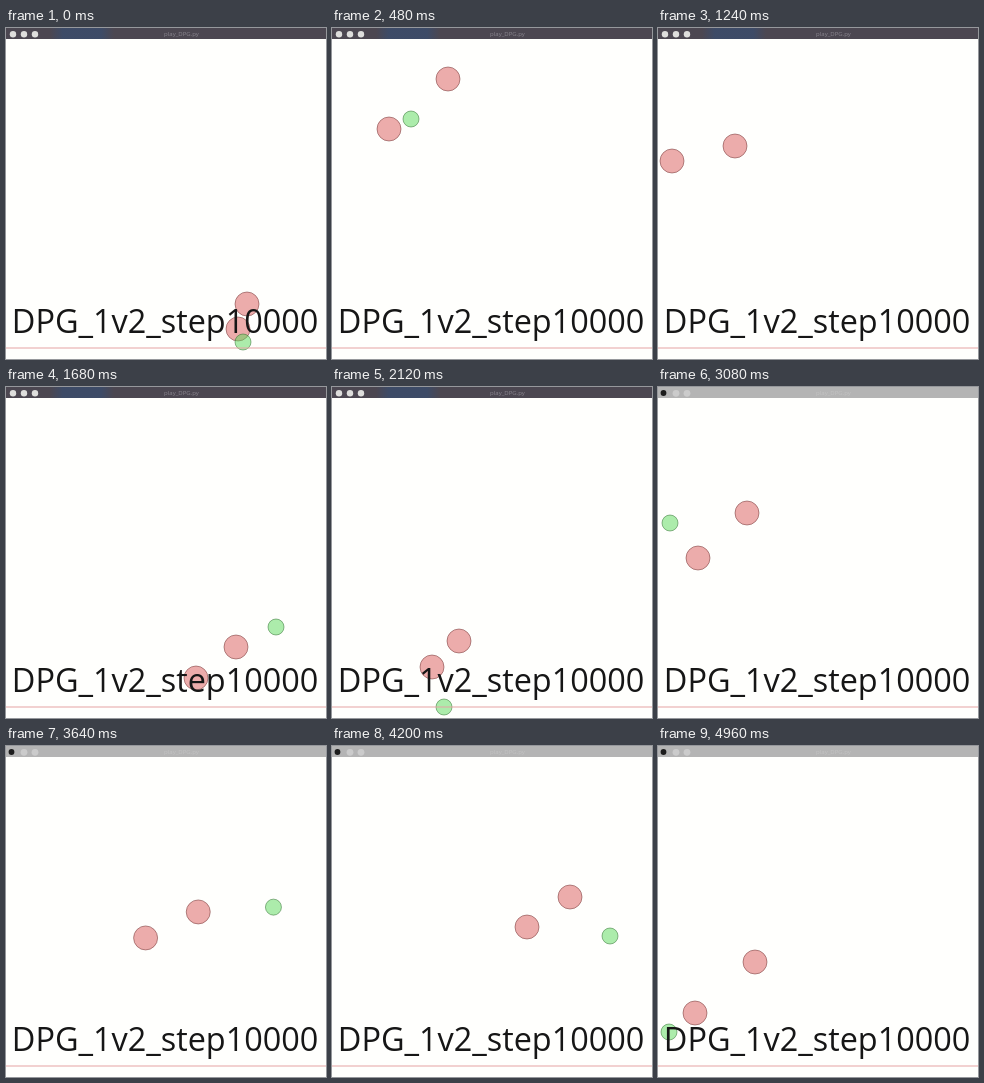
Write an HTML page with a canvas that moves like this. It is 320x331 px and loops after 5 s.

```html
<!DOCTYPE html>
<html lang="en">
<head>
<meta charset="utf-8">
<title>Chase</title>
<style>
  html, body { margin: 0; width: 100%; height: 100%; overflow: hidden; background: #fffffd; }
  canvas { display: block; width: 320px; height: 331px; }
</style>
</head>
<body>
<canvas id="stage"></canvas>
<script>
const W = 320, H = 331, LOOP = 5000, STEP = 40, BAR_SWITCH = 2520;
const canvas = document.getElementById('stage');
const ratio = window.devicePixelRatio || 1;
canvas.width = W * ratio;
canvas.height = H * ratio;
const ctx = canvas.getContext('2d');
ctx.scale(ratio, ratio);

// Waypoints: [time, x, y]
const hunterA = [
  [0, 241, 276], [80, 262, 236], [480, 116, 51], [560, 110, 25], [860, 150, 270],
  [1120, 120, 170], [1240, 77, 118], [1480, 160, 100], [1680, 230, 260], [1800, 285, 200],
  [2120, 127, 254], [2440, 110, 120], [2800, 215, 225], [3080, 89, 126], [3400, 165, 45],
  [3800, 190, 250], [3960, 110, 225], [4200, 238, 151], [4400, 250, 55], [4960, 97, 216]
];
const hunterB = [
  [0, 232, 301], [480, 57, 101], [560, 52, 80], [860, 100, 299], [1240, 14, 133],
  [1680, 190, 291], [1800, 240, 230], [2120, 100, 280], [2240, 52, 250], [2640, 180, 165],
  [2800, 175, 256], [3080, 40, 171], [3400, 110, 80], [3800, 140, 270], [3960, 63, 240],
  [4200, 195, 181], [4400, 215, 90], [4960, 37, 267]
];
const runner = [
  [0, 237, 314], [40, 234, 323], [480, 79, 91], [560, 60, 55], [920, 290, 90],
  [1120, 250, 0], [1240, 200, -20], [1440, 298, 60], [1680, 270, 240], [1840, 250, 300],
  [2120, 112, 320], [2360, 30, 200], [2680, 210, 60], [3080, 12, 136], [3400, 225, 20],
  [3560, 297, 100], [3880, 150, 323], [4200, 278, 190], [4280, 311, 220], [4480, 255, 323],
  [4960, 11, 286]
];

// Cubic through unevenly timed waypoints
function slope(path, i, axis) {
  const a = path[Math.max(i - 1, 0)], b = path[Math.min(i + 1, path.length - 1)];
  return (b[axis] - a[axis]) / (b[0] - a[0]);
}
function along(path, t) {
  let i = 0;
  while (i < path.length - 2 && t >= path[i + 1][0]) i++;
  const a = path[i], b = path[i + 1], span = b[0] - a[0];
  const u = Math.min((t - a[0]) / span, 1), u2 = u * u, u3 = u2 * u;
  return [1, 2].map(k =>
    (2 * u3 - 3 * u2 + 1) * a[k] + (3 * u2 - 2 * u3) * b[k] +
    span * ((u3 - 2 * u2 + u) * slope(path, i, k) + (u3 - u2) * slope(path, i + 1, k)));
}

function disc(x, y, r, fill, stroke) {
  ctx.beginPath();
  ctx.arc(x, y, r, 0, Math.PI * 2);
  ctx.fillStyle = fill;
  ctx.fill();
  if (stroke) {
    ctx.strokeStyle = stroke;
    ctx.lineWidth = 1;
    ctx.stroke();
  }
}
function agent(path, t, r, rgb, edge) {
  const [x, y] = along(path, t);
  disc(x, y, r, `rgba(${rgb},.5)`, `rgba(${edge},.5)`);
}
function label(text, x, y, size, color, align) {
  ctx.font = `${size}px "Open Sans", "Noto Sans", sans-serif`;
  ctx.textAlign = align;
  ctx.fillStyle = color;
  ctx.fillText(text, x, y);
}

function titleBar(light) {
  ctx.fillStyle = light ? '#b4b4b4' : '#4c4751';
  ctx.fillRect(0, 0, W, 11);
  if (!light) {
    const tint = ctx.createLinearGradient(44, 0, 108, 0);
    tint.addColorStop(0, 'rgba(58,76,108,0)');
    tint.addColorStop(.2, 'rgba(58,76,108,.8)');
    tint.addColorStop(.8, 'rgba(58,76,108,.8)');
    tint.addColorStop(1, 'rgba(58,76,108,0)');
    ctx.fillStyle = tint;
    ctx.fillRect(44, 0, 64, 11);
  }
  for (const x of [7, 18, 29]) {
    if (!light) disc(x, 6.3, 3.2, '#dededc');
    else if (x > 7) disc(x, 6.3, 3.4, '#cbcbcb');
  }
  if (light) disc(5.5, 6, 2.9, '#1c1c1c');
  label('play_DPG.py', 175.5, 8, 6, light ? '#c3c3c3' : '#8b8790', 'center');
}

function draw(t) {
  ctx.fillStyle = '#fffffd';
  ctx.fillRect(0, 0, W, H);
  agent(hunterA, t, 12, '217,89,89', '109,45,45');
  agent(hunterB, t, 12, '217,89,89', '109,45,45');
  agent(runner, t, 8, '89,217,89', '45,109,45');
  ctx.fillStyle = '#e6a3a3';
  ctx.fillRect(0, 319.5, W, 1);
  label('DPG_1v2_step10000', 5.8, 305, 32.4, '#161616', 'left');
  titleBar(t >= BAR_SWITCH);
}

const start = performance.now();
function tick(now) {
  const t = Math.max(now - start, 0) % LOOP;
  draw(Math.floor(t / STEP) * STEP);
  requestAnimationFrame(tick);
}
draw(0);
requestAnimationFrame(tick);
</script>
</body>
</html>
```
